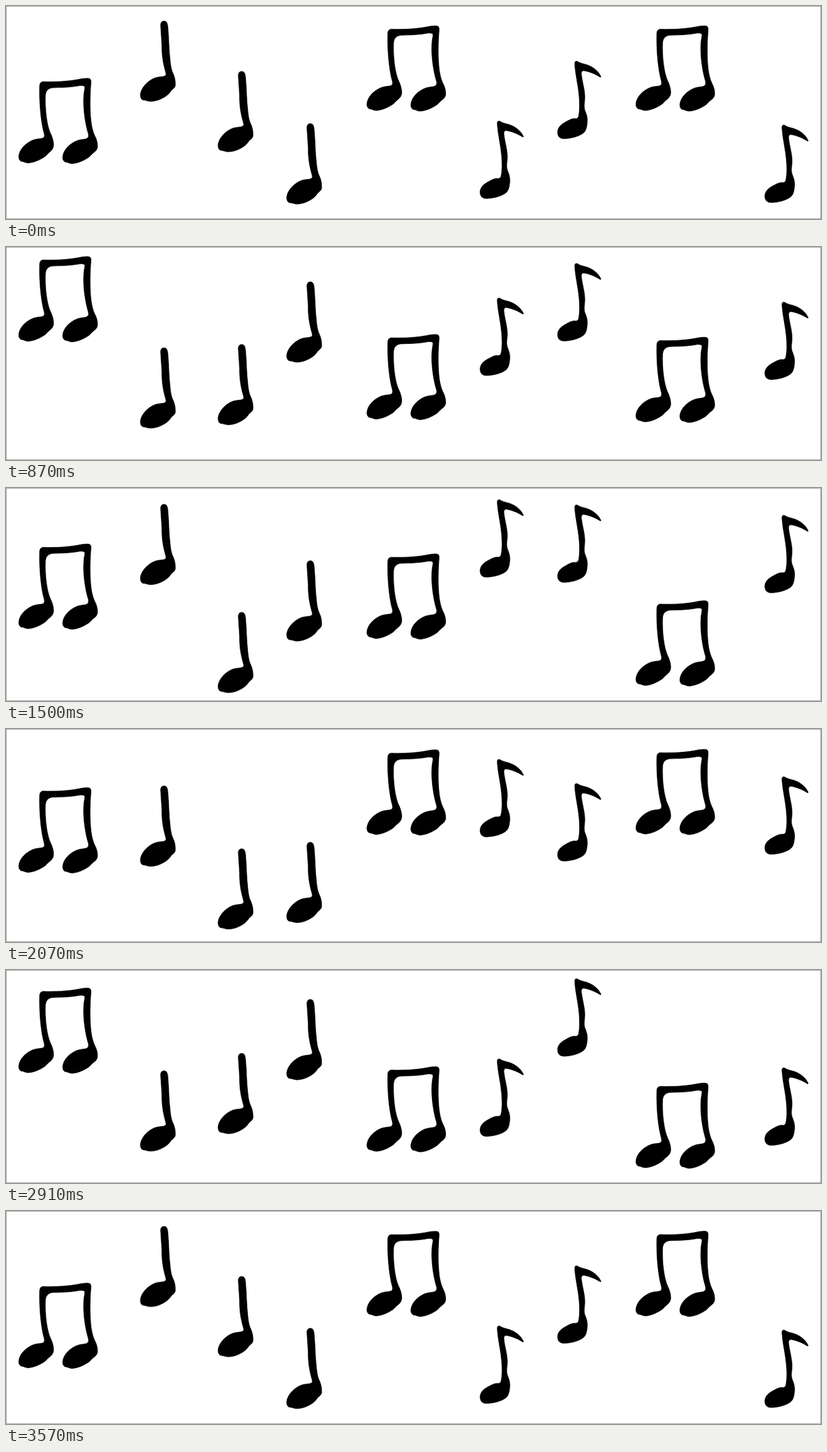
An HTML page for the animation above (3.6 s loop, 1280x336 px).

```html
<!DOCTYPE html>
<html lang="en">
<head>
<meta charset="utf-8">
<title>Bouncing notes</title>
<style>
html, body { margin: 0; width: 100%; height: 100%; overflow: hidden; background: #fff; }
svg { display: block; width: 1280px; height: 336px; }
path { stroke: #000; stroke-width: .7; }
</style>
</head>
<body>
<svg id="stage" viewBox="0 0 1280 336">
  <defs>
    <path id="beam" d="M52.8 12Q53 6 58 5.3C78 6 97 4.8 112 2.1C121 .2 129-.8 132 1Q134 2.6 133.4 8
      C132 24 131.6 46 133 62C134 76 136.8 85 139.6 91C142.4 96 143.8 102 143.8 107C143.8 112 141 115 137.5 117.5
      C134 120 132 124 127 126.5C120 131 112 134 104 134.7C98 134.2 97 132.2 93 132.2Q88.7 130 89 124
      C90 113 100 102.8 112 98.2C119 95.8 125 96.8 128 94.3Q130.3 92.3 129.4 88C124.4 72 121 48 122 30
      C122.3 21 124 17 123.7 13.5Q122.5 11 116 11.6C100 14.8 86 14.4 72 15.1Q63 16.8 62 26
      C61 48 64 74 70 87C72.5 92 74.8 99 74.8 105C74.8 110 72 114 68.5 116.5C65 119 63 123 58 125.5
      C51 130 43 133 35 133.7C29 133.2 28 131.2 24 131.2Q19.7 129 20 123C21 112 31 101.8 43 97.2
      C50 94.8 56 95.8 59 93.8Q61 92 60 87.5C55 70 52 40 52.8 12Z"/>
    <path id="quarter" d="M242.8 7C242.8 2 245 .2 248.5 .2C252 .2 253.6 3 254.2 9C256 28 255.7 45 257.7 61
      C258.7 72 260 78 262.5 83C265.2 89 266.3 95 266 102C265 106 262 107.5 259.5 110C257 114 254 117 250 119.5
      C243 124 235 127 226.5 127C222 126.6 219 125 215 124.8Q210.8 123 211 116C212 106 222 94 235 89.5
      C242 87.5 247 88.5 250 86.5Q252 85 251 82C247 68 244.5 55 244.8 38Z"/>
    <path id="eighth" d="M771.5 5C771.3 1 773-.6 776 .8C780 3.5 785 4.3 790 5.8C800 9 809 16 812.8 25
      Q812.5 26.3 810.5 25C803 20 793 16.5 785.5 15.3Q781.5 15.5 782 21C783.4 34 787.7 46 787.4 58
      C787.2 66 785.5 70 787.2 77C790 84 791.8 89 791.3 96C790.6 104 789.5 111 784 114.5
      C777 119.5 764 122.5 755 122.6C748 122.6 744.5 119 744.6 112C744.8 105 750 100 757 96.3
      C763 93 768 90.3 772 91Q776.5 91.5 777.6 87C779.5 78 779.3 66 778.3 55C777 38 772.5 22 771.5 5Z"/>
  </defs>
  <rect x=".5" y=".5" width="1279" height="335" fill="#fff" stroke="#a6a6a6"/>
</svg>
<script>
const STEP = 30, STEPS = 120;

// shape, x offset, resting y, far y, steps at which the note turns round
const notes = [
  ["beam", 0, 114, 14.7, [30, 60, 90]],
  ["quarter", 0, 23.5, 180.5, [22, 52, 90]],
  ["quarter", 122, 103, 199, [56]],
  ["quarter", 229.8, 185.4, 43.7, [35, 65, 95]],
  ["beam", 546.8, 31.2, 152.4, [37, 67, 97]],
  ["eighth", 0, 181.1, 18.1, [50]],
  ["eighth", 121.7, 86.7, 9.7, [41, 71, 101]],
  ["beam", 969.3, 31.2, 191.8, [46, 68, 92]],
  ["eighth", 447.2, 187.5, 41.5, [46]]
].map(([shape, x, rest, far, turns]) => {
  const el = document.createElementNS("http://www.w3.org/2000/svg", "use");
  el.setAttribute("href", "#" + shape);
  stage.append(el);
  return { el, x, rest, far, keys: [0, ...turns, STEPS] };
});

const ease = p => p * p * (3 - 2 * p);

function height({ rest, far, keys }, step) {
  const i = keys.findIndex(k => k > step) - 1;
  const p = ease((step - keys[i]) / (keys[i + 1] - keys[i]));
  return rest + (far - rest) * (i % 2 ? 1 - p : p);
}

function draw(time) {
  const step = Math.floor(time / STEP) % STEPS;
  for (const n of notes) {
    n.el.setAttribute("transform", `translate(${n.x} ${height(n, step).toFixed(2)})`);
  }
}

let start;
function tick(now) {
  start ??= now;
  draw(now - start);
  requestAnimationFrame(tick);
}
draw(0);
requestAnimationFrame(tick);
</script>
</body>
</html>
```
